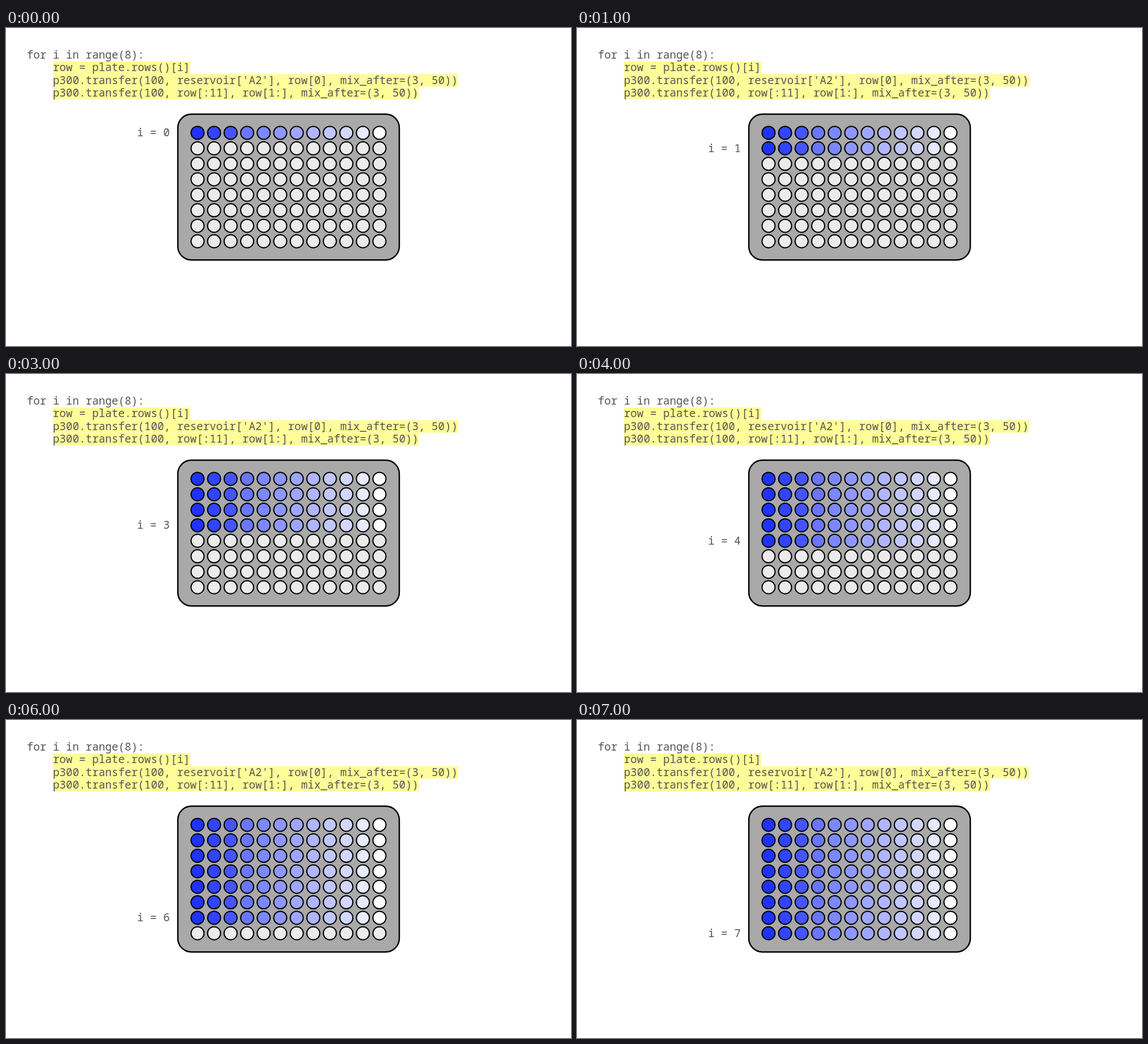
Animation, 997 px wide and 561 px high, one loop 9 s. Source, as an HTML page:

```html
<!DOCTYPE html>
<html lang="en">
<head>
<meta charset="utf-8">
<title>Serial dilution row by row</title>
<style>
  html, body { margin: 0; width: 100%; height: 100%; overflow: hidden; background: #fff; }
  svg { display: block; width: 100%; height: 100%; }
  text { font: 19.22px "Noto Sans Mono", monospace; fill: #555; white-space: pre; }
  .plate { fill: #a9a9a9; stroke: #000; stroke-width: 2.5; }
  .well { stroke: #000; stroke-width: 2; }
  .mark { fill: #fffd98; }
</style>
</head>
<body>
<svg id="stage" viewBox="0 0 997 561"></svg>
<script>
const ROWS = 8, COLUMNS = 12, STEP = 1000, LOOP = 9000;
const CHAR_WIDTH = 11.532, LINE_HEIGHT = 22.25;
const EMPTY = "#ebebeb";
const DILUTION = ["#2032ff", "#3145ff", "#4555ff", "#6a76ff", "#7c88ff", "#8e97ff",
                  "#9fa6ff", "#b0b5ff", "#c2c6ff", "#d3d7ff", "#e8eaff", "#ffffff"];
const CODE = [
  "for i in range(8):",
  "row = plate.rows()[i]",
  "p300.transfer(100, reservoir['A2'], row[0], mix_after=(3, 50))",
  "p300.transfer(100, row[:11], row[1:], mix_after=(3, 50))",
];
const stage = document.getElementById("stage");
const rowY = row => 184.9 + row * 27.34;

function add(tag, attributes, content = "") {
  const node = document.createElementNS("http://www.w3.org/2000/svg", tag);
  for (const name in attributes) node.setAttribute(name, attributes[name]);
  node.textContent = content;
  return stage.appendChild(node);
}

CODE.forEach((line, n) => {
  const x = 36.7 + (n ? 4 * CHAR_WIDTH : 0);
  const y = 54 + n * LINE_HEIGHT;
  if (n) add("rect", { class: "mark", x, y: y - 17.2, width: line.length * CHAR_WIDTH, height: LINE_HEIGHT + 0.1 });
  add("text", { x, y }, line);
});

add("rect", { class: "plate", x: 303.2, y: 152.1, width: 390.8, height: 257.1, rx: 24 });

const wells = Array.from({ length: ROWS }, (_, row) =>
  Array.from({ length: COLUMNS }, (_, column) =>
    add("circle", { class: "well", cx: 338 + column * 29.18, cy: rowY(row), r: 11.5 })));
const label = add("text", { x: 231.3 });

let shown = -1;
function draw(now) {
  const current = Math.min(ROWS - 1, Math.floor(now % LOOP / STEP));
  if (current !== shown) {
    shown = current;
    wells.forEach((line, row) => line.forEach((well, column) =>
      well.setAttribute("fill", row <= current ? DILUTION[column] : EMPTY)));
    label.textContent = `i = ${current}`;
    label.setAttribute("y", rowY(current) + 6.4);
  }
  requestAnimationFrame(() => draw(performance.now()));
}
draw(performance.now());
</script>
</body>
</html>
```
